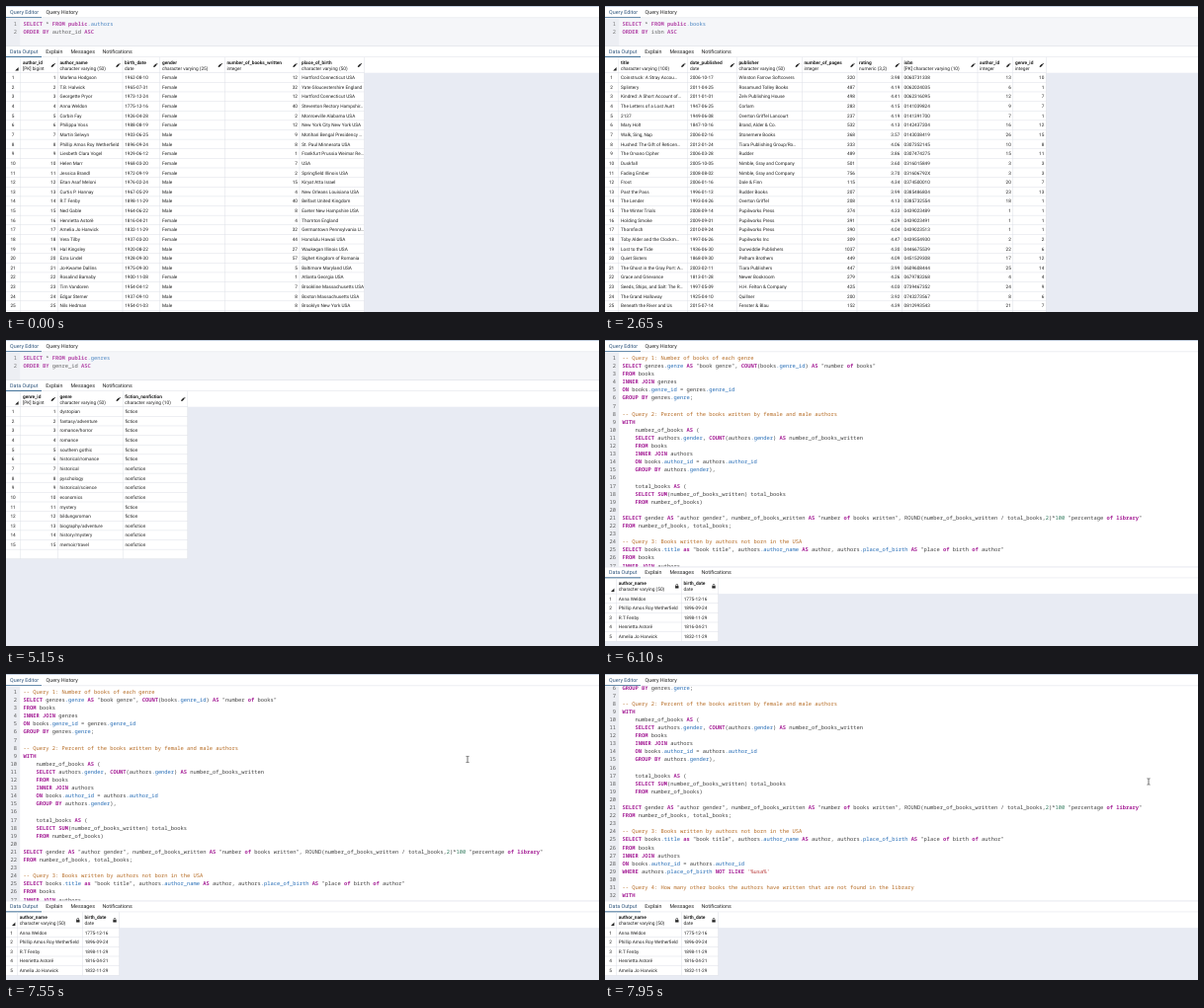
Recreate the animation shown at these times as an HTML page. Size 600 px wide and 310 px high, loop 8000 ms.

```html
<!DOCTYPE html>
<html lang="en">
<head>
<meta charset="utf-8">
<style>
html, body { margin: 0; height: 100%; overflow: hidden; background: #e8ebf3; }
svg { display: block; width: 100vw; height: 100vh; }
text { white-space: pre; text-rendering: geometricPrecision; fill: #222; font: 4.7px Roboto, sans-serif; }
.tab { font-size: 5.35px; }
.active { fill: #2b527a; }
.head { font-size: 4.8px; }
.name { font-weight: 700; }
.end { text-anchor: end; }
.mid { text-anchor: middle; }
.code { font: 5.41px "Noto Sans Mono", monospace; }
.num { fill: #444; }
.kw { fill: #908; font-weight: 600; }
.var { fill: #05a; }
.com { fill: #a50; }
.str { fill: #a11; }
.lit { fill: #164; }
</style>
</head>
<body>
<svg id="stage" viewBox="0 0 600 310" preserveAspectRatio="none">
  <clipPath id="pane"><rect y="12.2" width="600" height="217.5"/></clipPath>
</svg>
<script>
const stage = document.getElementById('stage');
const ROW = 9.63, LINE = 8.1, GRID = '#dcdfe6', BLUE = '#326690';

function add(parent, tag, attrs = {}, content) {
  const node = document.createElementNS('http://www.w3.org/2000/svg', tag);
  for (const key in attrs) node.setAttribute(key, attrs[key]);
  if (content !== undefined) node.textContent = content;
  return parent.appendChild(node);
}
const rect = (g, x, y, width, height, fill) => add(g, 'rect', { x, y, width, height, fill });
const label = (g, x, y, text, cls = '') => add(g, 'text', { x, y, class: cls }, text);
const lines = s => s.trim().split('\n');

function tabs(g, y, names) {
  names.forEach(([x, name], i) => label(g, x, y, name, i ? 'tab' : 'tab active'));
  rect(g, 0, y + 3.5, 600, .5, GRID);
  rect(g, 0, y + 3.2, 36, .9, BLUE);
}

// Groups: comment, string, dotted name, keyword, number
const TOKEN = /(--.*)|('[^']*')|(\.\w+)|\b(SELECT|AS|FROM|INNER|JOIN|ON|GROUP|BY|WITH|COUNT|SUM|WHERE|NOT|ILIKE|OF|LIBRARY|ORDER|ASC|PUBLIC)\b|\b(\d+)\b/gi;
const CLASSES = ['com', 'str', 'var', 'kw', 'lit'];

function codeLine(g, source, i) {
  const y = 19.9 + i * LINE;
  label(g, 11.1, y, i + 1, 'code num end');
  const text = label(g, 17.6, y, '', 'code');
  let last = 0;
  for (const m of source.matchAll(TOKEN)) {
    text.append(source.slice(last, m.index));
    add(text, 'tspan', { class: CLASSES[m.slice(1).findIndex(Boolean)] }, m[0]);
    last = m.index + m[0].length;
  }
  text.append(source.slice(last));
}

function editor(g, source, bottom, readOnly) {
  rect(g, 0, 0, 600, 12.2, '#fff');
  rect(g, 0, 0, 600, .8, '#b8c9dd');
  tabs(g, 8.1, [[4.1, 'Query Editor'], [40.6, 'Query History']]);
  const clip = add(g, 'g', { 'clip-path': 'url(#pane)' });
  rect(clip, 0, 12, 600, bottom - 12, readOnly ? '#f5f6f9' : '#fff');
  rect(clip, 0, 12, 14.2, bottom - 12, '#eceef3');
  const code = add(clip, 'g', { opacity: readOnly ? .7 : .88 });
  source.forEach((s, i) => codeLine(code, s, i));
  return code;
}

const ICONS = {
  pencil: 'M-2 2l.4-1.5 2.1-2.1 1.1 1.1L-.5 1.6zM.9-2l.5-.4 1.1 1.1-.5.4z',
  lock: 'M-1.7-.3h.4v-.7a1.3 1.3 0 0 1 2.6 0v.7h.4v2.4h-3.4zM-.7-.3h1.4v-.7a.7.7 0 0 0-1.4 0z'
};

// cols: [name, type, left edge, right aligned]
function results(g, top, cols, right, rows, spare = 1, icon = 'pencil') {
  const head = top + 11.2, body = top + 27, end = body + (rows.length + spare) * ROW;
  rect(g, 0, top, 600, body - top, '#fff');
  rect(g, 0, top - .4, 600, .6, GRID);
  tabs(g, top + 7.1, [[4.1, 'Data Output'], [40.2, 'Explain'], [65.4, 'Messages'], [97.4, 'Notifications']]);
  rect(g, 0, body, right, end - body, '#fff');
  const first = cols[0][2];
  add(g, 'path', { d: `M${first - 2.2} ${head + 10.2}v3.4h-3.4z`, fill: '#222' });
  for (let i = 0; i <= rows.length + spare; i++) rect(g, 0, body + i * ROW - .25, right, .5, GRID);
  cols.forEach(([name, type, x, alignRight], c) => {
    const edge = c + 1 < cols.length ? cols[c + 1][2] : right;
    rect(g, x - .25, head, .5, end - head, GRID);
    label(g, x + 2.1, head + 6.6, name, 'head name');
    label(g, x + 2.1, head + 12.7, type, 'head');
    add(g, 'path', { d: ICONS[icon], transform: `translate(${edge - 4.7} ${head + 8.2})`, fill: '#222' });
    rows.forEach((row, i) => label(g, alignRight ? edge - 2 : x + 2.2, body + i * ROW + 6.5,
      row.split('|')[c], alignRight ? 'end' : ''));
  });
  rect(g, right - .25, head, .5, end - head, GRID);
  rows.forEach((_, i) => label(g, first / 2 - .3, body + i * ROW + 6.5, i + 1, 'mid'));
}

const numbered = rows => rows.map((row, i) => `${i + 1}|${row}`);

const authors = numbered(lines(`
Marlena Hodgson|1962-08-10|Female|12|Hartford Connecticut USA
T.B. Halwick|1965-07-31|Female|32|Yate Gloucestershire England
Georgette Pryor|1973-12-24|Female|12|Hartford Connecticut USA
Anna Weldon|1775-12-16|Female|40|Steventon Rectory Hampshir…
Corbin Fay|1926-04-28|Female|2|Monroeville Alabama USA
Philippa Voss|1988-08-19|Female|12|New York City New York USA
Martin Selwyn|1903-06-25|Male|9|Motihari Bengal Presidency …
Phillip Amos Roy Wetherfield|1896-09-24|Male|8|St. Paul Minnesota USA
Liesbeth Clara Vogel|1929-06-12|Female|1|Frankfurt Prussia Weimar Re…
Helen Marr|1968-03-20|Female|7|USA
Jessica Brandl|1972-09-19|Female|2|Springfield Illinois USA
Eitan Asaf Meloni|1976-02-24|Male|15|Kiryat Atta Israel
Curtis P. Hannay|1967-05-29|Male|4|New Orleans Louisiana USA
R.T Fenby|1898-11-29|Male|40|Belfast United Kingdom
Ned Gable|1964-06-22|Male|8|Exeter New Hampshire USA
Henrietta Astorë|1816-04-21|Female|4|Thornton England
Amelia Jo Harwick|1832-11-29|Female|32|Germantown Pennsylvania U…
Vera Tilby|1937-03-20|Female|44|Honolulu Hawaii USA
Hal Kingsley|1920-08-22|Male|27|Waukegan Illinois USA
Ezra Lindel|1928-09-30|Male|57|Sighet Kingdom of Romania
Jo-Kwame Dallins|1975-09-30|Male|5|Baltimore Maryland USA
Rosalind Barnaby|1900-11-08|Female|1|Atlanta Georgia USA
Tim Vandoren|1954-04-12|Male|7|Brookline Massachusetts USA
Edgar Sterner|1937-09-10|Male|8|Boston Massachusetts USA
Nils Hedman|1954-01-03|Male|8|Brooklyn New York USA`));

const books = lines(`
Coinstruck: A Stray Accou…|2006-10-17|Winston Farrow Softcovers|320|3.98|0060731338|13|10
Splintery|2011-04-25|Rosamund Tolley Books|487|4.19|0062024035|6|1
Kindred: A Short Account of…|2011-01-01|Zelv Publishing House|498|4.41|0062316095|12|7
The Letters of a Lost Aunt|1947-06-25|Corlam|283|4.15|0141039824|9|7
2137|1949-06-08|Overton Griffel Lancourt|237|4.19|0141391700|7|1
Mary Holt|1847-10-16|Brand, Alder & Co.|532|4.13|0142437204|16|12
Walk, Sing, Nap|2006-02-16|Stonemere Books|368|3.57|0143038419|26|15
Hushed: The Gift of Reticen…|2012-01-24|Tiara Publishing Group/Ro…|333|4.06|0307352145|10|8
The Orvano Cipher|2006-03-28|Rudder|489|3.86|0307474275|15|11
Duskfall|2005-10-05|Nimble, Gray and Company|501|3.60|0316015849|3|3
Fading Ember|2008-08-02|Nimble, Gray and Company|756|3.70|031606792X|3|3
Frost|2006-01-16|Dale & Finn|115|4.34|0374500010|20|7
Past the Pass|1996-01-13|Rudder Books|207|3.99|0385486804|23|13
The Lender|1993-04-26|Overton Griffel|208|4.13|0385732554|18|1
The Winter Trials|2008-09-14|Pupilworks Press|374|4.33|0439023489|1|1
Holding Smoke|2009-09-01|Pupilworks Press|391|4.29|0439023491|1|1
Thornfinch|2010-09-24|Pupilworks Press|390|4.04|0439023513|1|1
Toby Alder and the Clockm…|1997-06-26|Pupilworks Inc|309|4.47|0439554930|2|2
Lost to the Tide|1936-06-30|Dunwiddie Publishers|1037|4.30|0446675539|22|6
Quiet Sisters|1868-09-30|Pelham Brothers|449|4.09|0451529308|17|12
The Ghost in the Gray Port: A…|2003-02-11|Tiara Publishers|447|3.99|0609608444|25|14
Grace and Grievance|1813-01-28|Newer Bookroom|279|4.26|0679783268|4|4
Seeds, Ships, and Salt: The R…|1997-05-09|H.H. Felton & Company|425|4.03|0739467352|24|9
The Grand Halloway|1925-04-10|Quillner|200|3.92|0743273567|8|6
Beneath the River and Us|2015-07-14|Fenster & Blau|152|4.39|0812993543|21|7`);

const genres = numbered(lines(`
dystopian|fiction
fantasy/adventure|fiction
romance/horror|fiction
romance|fiction
southern gothic|fiction
historical/romance|fiction
historical|nonfiction
pyschology|nonfiction
historical/science|nonfiction
economics|nonfiction
mystery|fiction
bildungsroman|fiction
biography/adventure|nonfiction
history/mystery|nonfiction
memoir/travel|nonfiction`));

const classics = [4, 8, 14, 16, 17].map(id => authors[id - 1].split('|').slice(1, 3).join('|'));

const queries = lines(`
-- Query 1: Number of books of each genre
SELECT genres.genre AS "book genre", COUNT(books.genre_id) AS "number of books"
FROM books
INNER JOIN genres
ON books.genre_id = genres.genre_id
GROUP BY genres.genre;

-- Query 2: Percent of the books written by female and male authors
WITH
    number_of_books AS (
    SELECT authors.gender, COUNT(authors.gender) AS number_of_books_written
    FROM books
    INNER JOIN authors
    ON books.author_id = authors.author_id
    GROUP BY authors.gender),

    total_books AS (
    SELECT SUM(number_of_books_written) total_books
    FROM number_of_books)

SELECT gender AS "author gender", number_of_books_written AS "number of books written", ROUND(number_of_books_written / total_books,2)*100 "percentage of library"
FROM number_of_books, total_books;

-- Query 3: Books written by authors not born in the USA
SELECT books.title as "book title", authors.author_name AS author, authors.place_of_birth AS "place of birth of author"
FROM books
INNER JOIN authors
ON books.author_id = authors.author_id
WHERE authors.place_of_birth NOT ILIKE '%usa%'

-- Query 4: How many other books the authors have written that are not found in the library
WITH`);

function tableView(table, key, ...grid) {
  const g = add(stage, 'g');
  editor(g, [`SELECT * FROM public.${table}`, `ORDER BY ${key} ASC`], 41, true);
  results(g, 40.7, ...grid);
  return g;
}

const authorView = tableView('authors', 'author_id', [
  ['author_id', '[PK] bigint', 14.8, true], ['author_name', 'character varying (50)', 52.3],
  ['birth_date', 'date', 118], ['gender', 'character varying (25)', 155.8],
  ['number_of_books_written', 'integer', 221.3, true], ['place_of_birth', 'character varying (50)', 297]
], 362.5, authors);

const bookView = tableView('books', 'isbn', [
  ['title', 'character varying (100)', 13.8], ['date_published', 'date', 83.8],
  ['publisher', 'character varying (50)', 133.3], ['number_of_pages', 'integer', 199.3, true],
  ['rating', 'numeric (3,2)', 255, true], ['isbn', '[PK] character varying (10)', 300.3],
  ['author_id', 'integer', 377, true], ['genre_id', 'integer', 412.8, true]
], 446.3, books);

const genreView = tableView('genres', 'genre_id', [
  ['genre_id', '[PK] bigint', 14.8, true], ['genre', 'character varying (50)', 52.3],
  ['fiction_nonfiction', 'character varying (10)', 118.2]
], 183.8, genres);

const queryView = add(stage, 'g');
const code = editor(queryView, queries, 230, false);
results(queryView, 230.1, [['author_name', 'character varying (50)', 11.6], ['birth_date', 'date', 77.5]],
  114.7, classics, 0, 'lock');
const cursor = add(queryView, 'path',
  { d: 'M-1.5-3.1h1.1l.4.4.4-.4h1.1M-1.5 3.1h1.1l.4-.4.4.4h1.1M0-2.7v5.4', fill: 'none', stroke: '#333', 'stroke-width': .7 });

const views = [[authorView, 0], [bookView, 1700], [genreView, 4400], [queryView, 6100]];
const clamp = p => Math.min(1, Math.max(0, p));
const smooth = p => p * p * (3 - 2 * p);

function draw(now) {
  const t = Math.floor(now % 8000 / 50) * 50;
  views.forEach(([g, start], i) => {
    const end = i < 3 ? views[i + 1][1] : 8000;
    g.style.display = t >= start && t < end ? '' : 'none';
  });
  const rise = smooth(clamp((t - 6950) / 600));
  const drift = 1 - (1 - clamp((t - 7550) / 400)) ** 2;
  cursor.style.display = t >= 6950 ? '' : 'none';
  cursor.setAttribute('transform', `translate(${400 + 67 * rise + 83 * drift} ${231 - 144.5 * rise + 22.5 * drift})`);
  code.setAttribute('transform', `translate(0 ${-44.8 * smooth(clamp((t - 7550) / 400))})`);
  requestAnimationFrame(() => draw(performance.now()));
}
draw(performance.now());
</script>
</body>
</html>
```
